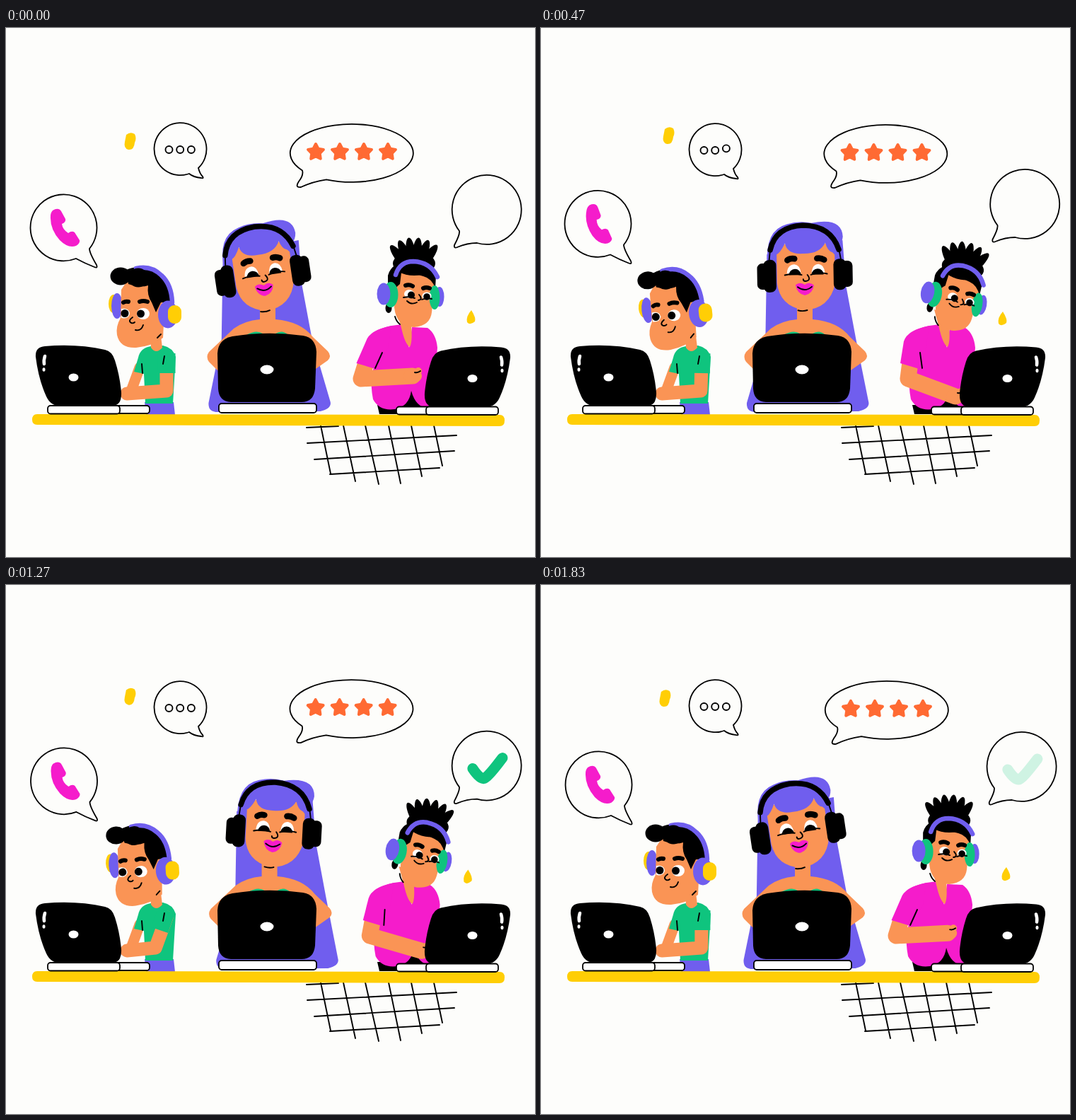
These frames come from a looping animation (748 by 748 pixels, 1860 ms). An HTML page:

```html
<!DOCTYPE html>
<html lang="en">
<head>
<meta charset="utf-8">
<title>Support team</title>
<style>
  html, body { margin: 0; width: 100%; height: 100%; overflow: hidden; background: #fdfdfb; }
  svg { display: block; width: 100%; height: 100%; }
  .line { fill: none; stroke: #000; stroke-width: 1.9; stroke-linecap: round; stroke-linejoin: round; }
  .bubble { fill: #fdfdfb; stroke: #000; stroke-width: 1.8; stroke-linejoin: round; }
  .brow { fill: none; stroke: #000; stroke-width: 6; stroke-linecap: round; }
  .thick { stroke-width: 8.5; }
  .base { fill: #fff; stroke: #000; stroke-width: 1.8; }
  .skin { fill: #fa9455; }
  .limb { fill: none; stroke: #fa9455; stroke-linecap: round; stroke-linejoin: round; }
  .purple { fill: #705eee; }
  .green { fill: #0fc47e; }
  .yellow { fill: #ffce05; }
  .pink { fill: #f51ccb; }
  .white { fill: #fff; }
  .band { fill: none; stroke: #705eee; stroke-width: 6.5; stroke-linecap: round; }
  .star { fill: #ff6a33; stroke: #ff6a33; stroke-width: 4; stroke-linejoin: round; }
</style>
</head>
<body>
<svg viewBox="0 0 748 748">
  <defs>
    <g id="laptop">
      <rect class="base" x="150" y="534" width="53" height="11" rx="4"/>
      <path d="M42 465Q41 451 55 450Q100 446 140 455Q150 457 154 470Q161 492 163 515Q164 534 150 534H75Q63 534 57 521Q46 497 42 465Z"/>
      <path d="M55 464Q53 470 54 475" fill="none" stroke="#fff" stroke-width="4.5" stroke-linecap="round"/>
      <ellipse class="white" cx="53.500" cy="483" rx="2" ry="2.800"/>
      <ellipse class="white" cx="95.500" cy="494" rx="7" ry="5.500"/>
      <rect class="base" x="59" y="534" width="102" height="11.500" rx="4"/>
    </g>
  </defs>

  <path class="line" d="M425 565L470 563M426 587L637 576M436 610L634 598M458 631L613 622M445 562L459 630M477 562L494 641M508 562L527 645M541 562L558 644M573 562L588 634M605 562L617 619"/>

  <path id="blobL" class="yellow" d="M170 151Q176 146 182 150Q185 156 182 162Q181 173 173 172Q166 170 168 161Z"/>
  <path id="blobR" class="yellow" d="M658 399Q665 410 663 415Q656 421 652 416Q650 408 658 399Z"/>

  <g id="chat">
    <path class="bubble" d="M272 198Q274 206 278 210Q280 213 276 212Q265 211 259 206A37 37 0 1 1 272 198Z"/>
    <g id="dots" class="line"></g>
  </g>

  <g id="call">
    <path class="bubble" d="M118 312Q118 318 128 335Q130 340 125 338Q112 333 99 326A47 47 0 1 1 118 312Z"/>
    <path id="phone" class="pink" d="M66 258Q74 253 78 259L84 270Q85 275 79 277Q80 285 88 290Q93 286 97 289L104 300Q105 304 99 308Q88 312 76 300Q62 284 63 266Q63 261 66 258Z"/>
  </g>

  <g id="rating">
    <path class="bubble" d="M419 201.400Q421 208 414 217Q408 226 417 225Q434 217 453 214.300A87 41 0 1 0 419 201.400Z"/>
    <g id="stars"></g>
  </g>
  <g id="rays" fill="none" stroke="#22223a" stroke-width="1.700">
    <ellipse rx="4.500" ry="14" transform="translate(563 97) rotate(-4)"/>
    <ellipse rx="4.500" ry="14" transform="translate(603 109) rotate(38)"/>
    <ellipse rx="4.500" ry="14" transform="translate(626 139) rotate(78)"/>
  </g>

  <g id="done">
    <path class="bubble" d="M641 287Q642 292 634 307Q633 312 638 310Q652 304 666 304A49 49 0 1 0 641 287Z"/>
    <path id="check" d="M660 261Q670 276 676 275Q680 275 702 246" pathLength="100" fill="none" stroke="#0fc47e" stroke-width="15" stroke-linecap="round" stroke-linejoin="round"/>
  </g>

  <!-- left agent -->
  <path class="purple" d="M196 529H237L239 547H198Z"/>
  <path class="limb" d="M189 480L177 513" stroke-width="15"/>
  <path class="green" d="M205 450Q190 452 187 466L181 486L195 489L197 531H236L240 465Q236 452 222 449Z"/>
  <path id="armL" class="limb" stroke-width="19"/>
  <path id="sleeveL" fill="none" stroke="#0fc47e" stroke-width="25"/>
  <path class="line" d="M192 475L193 488M224 464L222 475"/>
  <path class="skin" d="M203 418H217L221 452Q212 462 205 452Z"/>
  <g id="headL">
    <ellipse class="yellow" cx="152" cy="390" rx="7" ry="13"/>
    <ellipse class="purple" cx="157" cy="393" rx="8" ry="18"/>
    <path class="skin" d="M163 370L162 410Q155 422 157 434Q161 453 184 452Q206 450 222 438L224 398L214 358L175 352Z"/>
    <path d="M170 342Q185 335 203 340Q220 345 229 361Q235 372 235 388H219L212 402L206 388Q199 378 201 364Q190 368 173 362Z"/>
    <path class="band" d="M184 340Q205 335 220 350Q234 363 235 388"/>
    <ellipse cx="162" cy="351" rx="14.500" ry="12.500"/>
    <ellipse cx="187" cy="353" rx="14" ry="13.500"/>
    <ellipse class="purple" cx="229" cy="405" rx="14" ry="19.500"/>
    <rect class="yellow" x="229" y="392" width="19" height="26" rx="9"/>
    <path class="white" d="M163 397Q174 395 175 404Q173 412 163 410Z"/>
    <ellipse class="white" cx="194" cy="404" rx="9" ry="8"/>
    <circle cx="168" cy="403.500" r="5.500"/>
    <circle cx="190.500" cy="404" r="5.500"/>
    <path class="brow" d="M166 388Q169 386 173 387M189 387Q194 385 200 387"/>
    <path class="line" d="M179 409Q172 414 177 417Q180 418 182 416M183 427Q191 429 194 420M214 438L219 433"/>
  </g>

  <!-- middle agent -->
  <path id="mane" class="purple"/>
  <g id="torso">
    <path class="skin" d="M362 385V412Q340 414 325 425L290 458Q285 465 290 472L302 484H438L458 470Q464 464 458 457L437 437Q420 415 384 412V385Z"/>
    <path class="green" d="M343 434Q357 426 366 432H384Q394 426 402 434Z"/>
  </g>
  <g id="headM">
    <path class="skin" d="M335 305V360Q338 392 372 399Q409 398 417 362V305Z"/>
    <path class="purple" d="M322 335Q318 285 350 277Q368 272 385 276Q428 268 429 296Q428 305 422 310V335Q419 322 414 318Q407 316 404 304Q396 320 372 319Q350 320 347 304Q340 318 334 320Q328 324 328 340Z"/>
    <path d="M326 313Q334 280 373 279Q412 280 423 314" fill="none" stroke="#000" stroke-width="7.500" stroke-linecap="round"/>
    <path class="line" d="M326 312L324 330M423 312L426 330"/>
    <rect x="307" y="332" width="16" height="37" rx="7"/>
    <rect x="316" y="327" width="18" height="46" rx="8"/>
    <rect x="415" y="327" width="18" height="44" rx="8"/>
    <rect x="426" y="330" width="16" height="37" rx="7"/>
    <path class="brow thick" d="M350 328Q354 325 360 326M392 326Q397 325 402 328"/>
    <g id="openM">
      <path class="white" d="M349 347Q350 334 360 334Q368 335 369 347ZM384 347Q385 334 394 334Q402 335 403 347Z"/>
      <path d="M352 349A8.500 8.500 0 0 1 369 349ZM384 349A8.500 8.500 0 0 1 401 349Z"/>
      <path class="line" d="M346 349Q358 346 370 349M383 349Q396 345 406 348"/>
    </g>
    <path id="shutM" class="line" d="M346 350Q358 345 369 352M384 352Q396 346 407 349M347 350L343 346M405 349L409 345"/>
    <path class="line" d="M378 349Q384 357 375 358Q372 358 372 355M364 399Q371 401 377 399"/>
    <path class="pink" d="M361 363Q367 358 374 363Q381 358 387 364Q385 376 374 378Q363 376 361 363Z"/>
    <path class="line" d="M364 366Q374 374 384 366"/>
  </g>

  <!-- right agent -->
  <path d="M525 533H600V546H528ZM558 512H596V540H558Z"/>
  <g id="shirt">
    <path class="pink" d="M518 432Q526 425 545 421L560 419L570 452L574 423L596 424Q608 432 610 452L606 500L598 537Q580 538 573 513Q570 535 550 539Q528 542 519 525Q514 500 520 480Z"/>
    <path class="skin" d="M552 398L559 424Q564 447 571 451Q575 444 573 420L590 410Z"/>
  </g>
  <path id="armR" class="limb" stroke-width="23"/>
  <path id="sleeveR" class="pink"/>
  <path id="creaseR" class="line"/>
  <g id="fist">
    <ellipse class="skin" rx="13" ry="10"/>
    <circle class="skin" cx="8" cy="-7" r="5"/>
    <path class="line" d="M3 -5Q7 -4 11 -7"/>
  </g>
  <g id="headR">
    <ellipse cx="541" cy="396" rx="4.500" ry="7"/>
    <path class="skin" d="M552 342L549 395Q552 423 577 423Q600 421 602 402L607 350L560 338Z"/>
    <g id="spikes"></g>
    <ellipse cx="577" cy="333" rx="30" ry="17"/>
    <path d="M540 350Q545 330 577 328Q608 330 608 350L607 368Q602 354 590 351Q570 345 559 346L557 362L548 370L540 362Z"/>
    <path class="band" d="M551 349Q557 330 576 330Q600 331 610 352"/>
    <ellipse class="green" cx="544" cy="377" rx="10.500" ry="18"/>
    <ellipse class="purple" cx="534" cy="376" rx="9.500" ry="15.500"/>
    <ellipse class="purple" cx="613" cy="380" rx="6.500" ry="14"/>
    <ellipse class="green" cx="606" cy="381" rx="7.500" ry="17"/>
    <path class="brow" d="M565 364Q570 362 575 365M590 368Q594 366 599 368"/>
    <g id="openR">
      <ellipse class="white" cx="570" cy="376" rx="7" ry="6"/>
      <ellipse class="white" cx="595" cy="379" rx="6.500" ry="5.500"/>
      <circle cx="573" cy="377.500" r="5"/>
      <circle cx="595" cy="380" r="4.800"/>
      <path class="line" d="M562 381Q570 379 578 382M588 384Q595 381 602 383"/>
    </g>
    <path id="shutR" class="line" d="M563 379Q570 384 578 381M588 382Q595 386 603 382"/>
    <path class="line" d="M584 377Q590 384 583 385M567 386Q573 392 581 388M550 408Q552 415 557 419"/>
  </g>

  <path class="yellow" d="M44 546L698 547Q705 547 705 555Q705 563 698 563L44 561Q37 561 37 554Q37 546 44 546Z"/>
  <use href="#laptop"/>
  <use href="#laptop" transform="translate(755 1.500) scale(-1 1)"/>
  <path d="M299 460Q300 440 320 436Q369 428 420 435Q438 438 439 458L437 510Q435 529 418 529H318Q301 528 300 510Z"/>
  <ellipse class="white" cx="369" cy="483" rx="9.500" ry="6.500"/>
  <rect class="base" x="301" y="531" width="138" height="13" rx="4"/>
</svg>

<script>
const LOOP = 1860;
const KEYS = [0, 170, 470, 730, 1070, 1430];
const $ = id => document.getElementById(id);
const clamp = v => Math.max(0, Math.min(1, v));
const bump = (t, from, span) => Math.sin(Math.PI * clamp((t - from) / span));

// Smooth looping curve through one value per key time, without overshoot.
function curve(v, t) {
  const n = KEYS.length, w = j => (j + n) % n;
  const gap = j => (KEYS[w(j + 1)] - KEYS[w(j)] + LOOP) % LOOP;
  const slope = j => (v[w(j + 1)] - v[w(j)]) / gap(j);
  const tangent = j => {
    const a = slope(j - 1), b = slope(j);
    return a * b <= 0 ? 0 : 2 * a * b / (a + b);
  };
  const i = KEYS.findLastIndex(k => k <= t);
  const h = gap(i), u = (t - KEYS[i]) / h, q = 1 - u;
  return q * q * (1 + 2 * u) * v[i] + u * u * (3 - 2 * u) * v[w(i + 1)]
    + h * u * q * (q * tangent(i) - u * tangent(i + 1));
}

const moves = {
  blobL: { x: [0, 2, 5, 5, 2, -1], y: [0, -3, -8, -9, -5, -1] },
  blobR: { x: [0, -1, -5, -6, -6, -3], y: [0, 0, 2, 3, 4, 3] },
  chat: { y: [0, .5, 1, 1.5, 2, 2] },
  call: { x: [0, -.5, -1, -.5, .5, .5], y: [0, -2, -5.5, -7, -7, -3] },
  phone: { r: [0, 0, 8, 9, 2, 0], at: '82 282' },
  rating: { x: [0, -.5, -1.5, -1.5, -1, 0], y: [0, .5, 1, 1, -1.5, -2] },
  done: { x: [0, 2, 4.5, 4.5, 2, -1], y: [0, -3, -8, -8, -4.5, 0] },
  headL: { r: [0, 0, -6, -7, -7, -.5], at: '212 460' },
  headM: { r: [-8.5, -7.4, -1, 3, 6, -.5], at: '376 426' },
  torso: { x: [-3, 0, 0, 0, 0, -1] },
  shirt: { x: [0, 1, 4, 4, 4, 3] },
  headR: { r: [0, 1, 10, 10.3, 10.3, 9], at: '552 447' }
};
const maneTip = [-5.5, -5.5, -1, 4, 8, 2];
const elbowL = [227, 227, 226, 226, 211, 212];
const elbowR = [502, 507, 519, 518, 518, 510];
const handR = { x: [575, 580, 586, 586, 586, 588], y: [492, 498, 521, 521, 521, 512] };

function add(parent, tag, attrs) {
  const el = document.createElementNS('http://www.w3.org/2000/svg', tag);
  for (const k in attrs) el.setAttribute(k, attrs[k]);
  return $(parent).appendChild(el);
}

const starPoints = Array.from({ length: 10 }, (_, i) => {
  const r = i % 2 ? 6 : 11.5, a = Math.PI * (i / 5 - .5);
  return [r * Math.cos(a), r * Math.sin(a)].map(c => c.toFixed(2)).join();
}).join(' ');
const stars = [0, 1, 2, 3].map(() => add('stars', 'polygon', { class: 'star', points: starPoints }));
const dots = [0, 1, 2].map(i => add('dots', 'circle', { cx: 230.5 + 15.7 * i, r: 5 }));
for (let a = -38; a <= 37; a += 15)
  add('spikes', 'ellipse', { cx: 577, cy: 322, rx: 7, ry: 26, transform: `rotate(${a} 577 350)` });

const show = (id, on) => $(id).style.display = on ? '' : 'none';
const path = (id, d) => $(id).setAttribute('d', d);

function blink(side, t, period) {
  const p = t % period, shut = p > 95 && p < 215;
  show('open' + side, !shut);
  show('shut' + side, shut);
}

function draw(t) {
  for (const id in moves) {
    const { x, y, r, at } = moves[id];
    const shift = `translate(${x ? curve(x, t) : 0} ${y ? curve(y, t) : 0})`;
    $(id).setAttribute('transform', r ? `${shift} rotate(${curve(r, t)} ${at})` : shift);
  }

  dots.forEach((d, i) => d.setAttribute('cy', 172 - 12 * bump(t % 620, 100 + 60 * i, 270)));
  stars.forEach((s, i) => {
    const size = 1 + .18 * bump(t, 500 + 80 * i, 400);
    s.setAttribute('transform', `translate(${438 + 34 * i} 175.5) scale(${size})`);
  });

  const out = 1 - clamp((t - 850) / 180);
  $('rays').setAttribute('transform', `translate(${-22 * out * out} ${18 * out * out})`);
  $('rays').style.opacity = clamp((t - 850) / 60) * clamp((1160 - t) / 160);

  const drawn = clamp((t - 960) / 250);
  $('check').setAttribute('stroke-dasharray', `${100 * drawn} 200`);
  $('check').style.opacity = drawn ? clamp((LOOP - t) / 150) : 0;

  const a = curve(moves.headM.r, t) * Math.PI / 180 * 96, b = curve(maneTip, t);
  path('mane', `M${321 + a} 320L${319 + a} 440L${292 + b} 530Q${291 + b} 543 ${305 + b} 543`
    + `L${450 + b} 542Q${467 + b} 538 ${464 + b} 528L${447 + a} 440L${433 + a} 365L${428 + a} 300Z`);

  const el = curve(elbowL, t);
  path('armL', `M227 470L${el} 513L171 517`);
  path('sleeveL', `M227 460L${227 + (el - 227) * .62} 488`);

  const er = curve(elbowR, t), hx = curve(handR.x, t), hy = curve(handR.y, t);
  const sx = 524 + curve(moves.shirt.x, t), cuff = sx + (er - sx) * .66;
  path('armR', `M${cuff} 472L${er} 496L${hx} ${hy}`);
  path('sleeveR', `M${sx + 21} 421Q${sx - 10} 427 ${sx - 15} 443L${cuff - 14} 474L${cuff + 16} 483L${sx + 16} 452Z`);
  path('creaseR', `M${sx + 8} 459L${er + 20} 481`);
  $('fist').setAttribute('transform', `translate(${hx} ${hy})`);

  blink('M', t, 930);
  blink('R', t, 620);
}

const start = performance.now();
function tick() {
  draw((performance.now() - start) % LOOP);
  requestAnimationFrame(tick);
}
tick();
</script>
</body>
</html>
```
